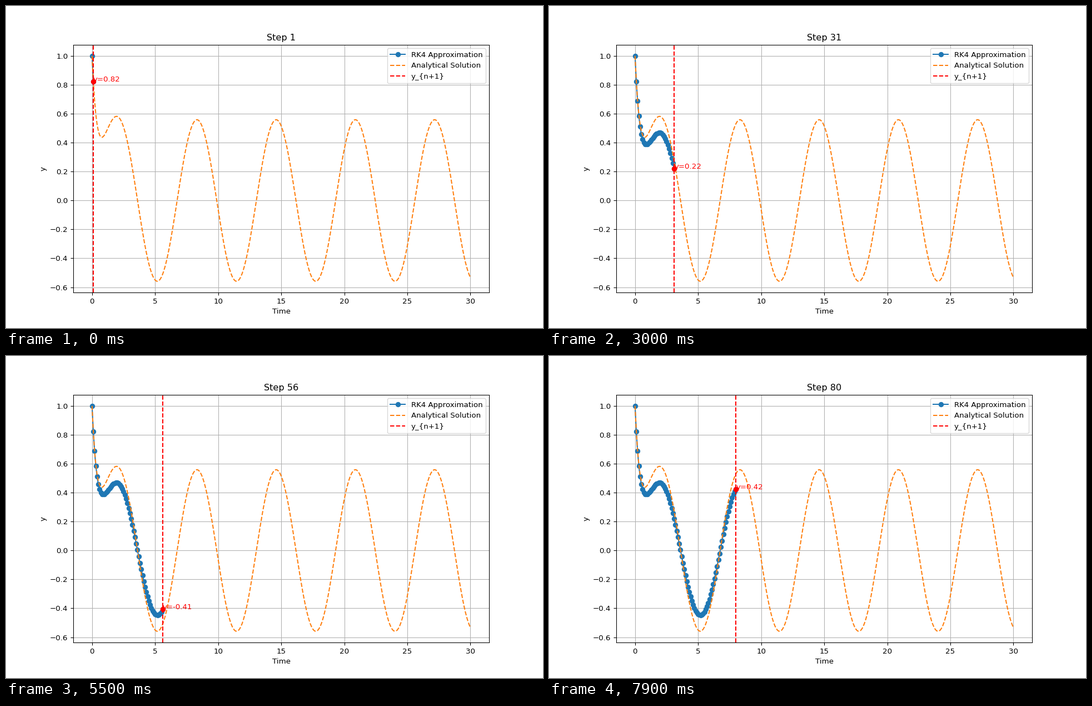
A matplotlib script for the animation above (8 s loop, 966 by 580 pixels).

```python
import numpy as np
import matplotlib.pyplot as plt
from matplotlib.animation import FuncAnimation

DPI = 96.6
STEPS = 80
H = 0.1


def slope(t, y):
    return -2 * y + np.sin(t)


def exact(t):
    return 1.25 * np.exp(-2 * t) + 0.5 * np.sin(t) - 0.25 * np.cos(t)


def rk4_step(t, y):
    k1 = slope(t, y)
    k2 = slope(t + H / 2, y + H * k1 / 2)
    k3 = slope(t + H / 2, y + H * k2 / 2)
    k4 = slope(t + H, y + H * k3)
    return y + H * (k1 + 2 * k2 + 2 * k3 + k4) / 6


ts = np.linspace(0, 30, 301)
ys = [1.0]
for t in ts[:STEPS]:
    ys.append(rk4_step(t, ys[-1]))

plt.rcParams["font.family"] = "DejaVu Sans"
fig, ax = plt.subplots(figsize=(966.001 / DPI, 580.001 / DPI), dpi=DPI)

approx, = ax.plot([], [], "o-", color="C0", label="RK4 Approximation")
ax.plot(ts, exact(ts), "--", color="C1", label="Analytical Solution")
cursor = ax.axvline(0, color="r", linestyle="--", label="y_{n+1}")
dot, = ax.plot([], [], "ro")
note = ax.text(0, 0, "", color="r")

ax.set_xlim(-1.5, 31.5)
ax.set_ylim(-0.637, 1.078)
ax.set_xlabel("Time")
ax.set_ylabel("y")
title = ax.set_title("Step 1")
ax.legend(loc="upper right")
ax.grid(True)


def update(i):
    n = i + 1
    t, y = ts[n], ys[n]
    approx.set_data(ts[:n + 1], ys[:n + 1])
    cursor.set_xdata([t, t])
    dot.set_data([t], [y])
    note.set_position((t, y))
    note.set_text(f"y={y:.2f}")
    title.set_text(f"Step {n}")
    return approx, cursor, dot, note, title


anim = FuncAnimation(fig, update, frames=STEPS, interval=100,
                     repeat=True, repeat_delay=0, blit=False)
plt.show()
```
